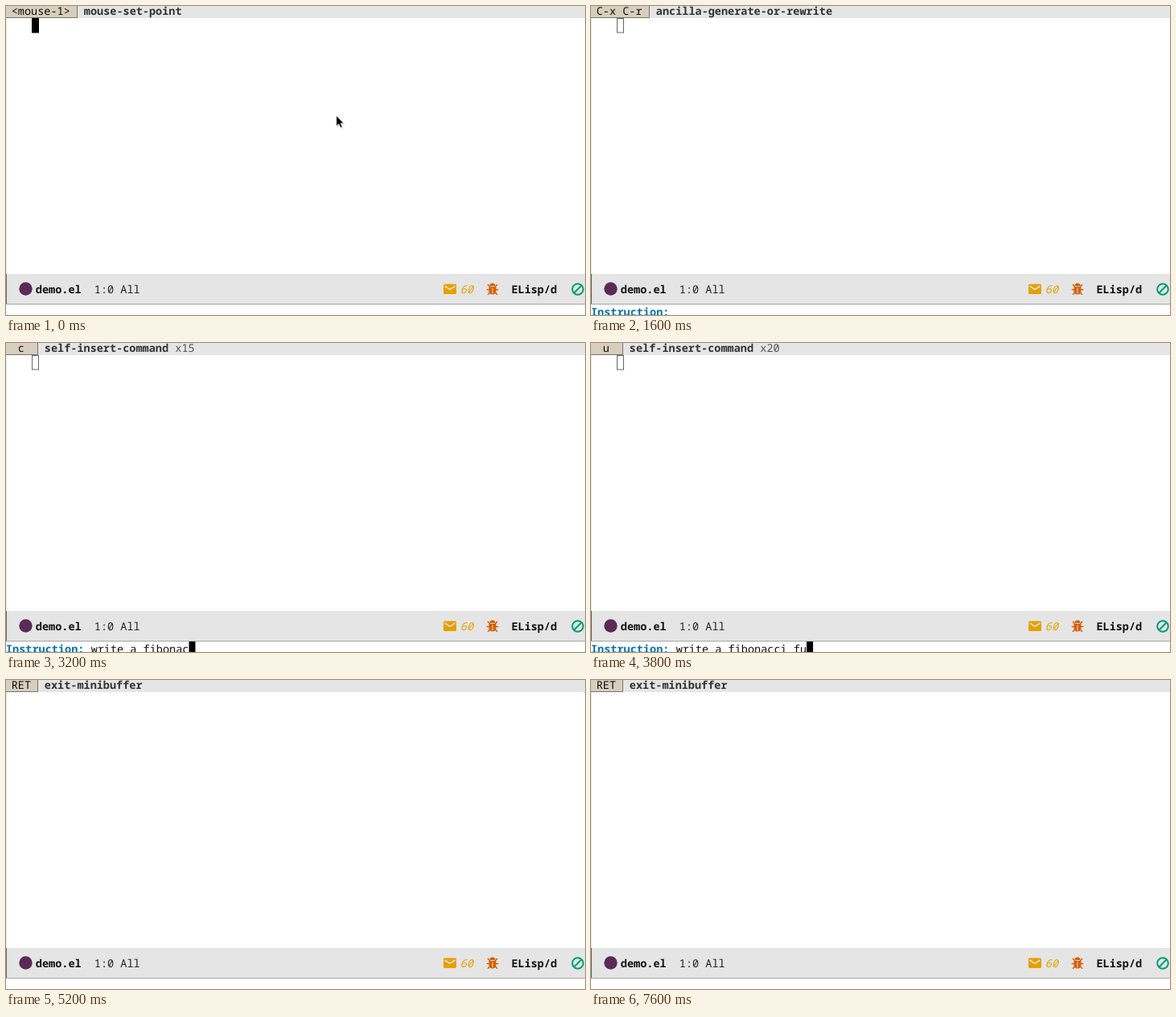
Write an HTML page that moves like this. It is 720x384 px and loops after 8 s.

```html
<!DOCTYPE html>
<html lang="en">
<head>
<meta charset="utf-8">
<title>Editor demo</title>
<style>
  html, body { margin: 0; width: 100%; height: 100%; overflow: hidden; background: #fff; }
  svg { display: block; width: 720px; height: 384px; }
  text {
    font: 13.54px "Noto Sans Mono", "DejaVu Sans Mono", monospace;
    text-rendering: geometricPrecision;
    white-space: pre;
    fill: #111;
  }
  .bold { font-weight: 700; }
</style>
</head>
<body>
<svg viewBox="0 0 720 384">
  <path d="M.5 15V333" stroke="#e8e8e8"/>

  <!-- Header: last key and its command -->
  <rect width="720" height="15" fill="#e5e5e5"/>
  <rect id="keyBox" height="14" fill="#d7cebe"/>
  <path id="keyEdge" fill="none" stroke="#77736b"/>
  <text id="key" y="11"></text>
  <text id="command" y="11" class="bold" style="fill:#333"></text>
  <text id="count" y="11" style="fill:#555"></text>

  <rect id="point" x="32.5" y="15.5" width="8" height="17.5"/>

  <!-- Mode line -->
  <rect y="333" width="720" height="38" fill="#e5e5e5"/>
  <path d="M.5 333V371" stroke="#666"/>
  <path d="M0 370.5H720" stroke="#a5a5a5"/>
  <circle cx="24.5" cy="351.5" r="8.2" fill="#5b2b57"/>
  <text x="36.8" y="357" class="bold">demo.el</text>
  <text x="109.8" y="357" style="fill:#222">1:0 All</text>
  <rect x="544" y="345.5" width="16" height="12.5" rx="1.5" fill="#e69f00"/>
  <path d="M545.5 348L552 352.3 558.5 348" fill="none" stroke="#e5e5e5" stroke-width="1.5"/>
  <text x="564.8" y="357" style="fill:#e69f00;font-style:italic">60</text>
  <g stroke="#d55e00" stroke-width="1.5" fill="none">
    <path d="M599 346l3 3.2M611 346l-3 3.2M597.7 352.5h14.6M599 358.7l3-3.2M611 358.7l-3-3.2"/>
    <path d="M601.6 348a3.4 3.4 0 0 1 6.8 0z" fill="#d55e00" stroke="none"/>
    <path d="M600.6 349h8.8v5a4.4 4.6 0 0 1-8.8 0z" fill="#d55e00" stroke="none"/>
    <path d="M605 350.5v7" stroke="#e5e5e5" stroke-width="1"/>
  </g>
  <text x="628.4" y="357" class="bold">ELisp/d</text>
  <g fill="none" stroke="#009e73" stroke-width="2">
    <circle cx="711" cy="352" r="6.8"/>
    <path d="M706.3 356.7l9.4-9.4"/>
  </g>

  <!-- Minibuffer -->
  <g id="minibuffer">
    <text y="385" class="bold" style="fill:#0072b2">Instruction:</text>
    <text id="input" y="385"></text>
    <rect id="caret" y="371" width="8" height="18"/>
  </g>

  <g id="mouse">
    <path d="M412 137.5v13l3-2.7 2 4.6 2.3-1-2-4.4h4z" fill="#0003"/>
    <path d="M410.8 136.3v13l3-2.7 2 4.6 2.3-1-2-4.4h4z" stroke="#fff" stroke-width=".7"/>
  </g>
</svg>
<script>
const LOOP = 8000, STEP = 200, CHAR = 8.125;
const PROMPT_AT = 1000, TYPE_AT = 1600, RETURN_AT = 4600, BLINK = 500;
const PHRASE = 'write a fibonacci function';
const TYPING = [[TYPE_AT, 0], [2400, 9], [3800, 20], [4400, PHRASE.length]];

const el = Object.fromEntries([...document.querySelectorAll('[id]')].map(e => [e.id, e]));
const show = (node, visible) => node.setAttribute('visibility', visible ? 'visible' : 'hidden');
const put = (node, x, text) => {
  node.setAttribute('x', x);
  node.textContent = text;
};

function typedCount(t) {
  for (let i = 1; i < TYPING.length; i++) {
    const [t0, n0] = TYPING[i - 1], [t1, n1] = TYPING[i];
    if (t <= t1) return Math.max(0, Math.floor(n0 + (n1 - n0) * (t - t0) / (t1 - t0)));
  }
  return PHRASE.length;
}

function lastCommand(t, typed) {
  if (t < PROMPT_AT) return ['<mouse-1>', 'mouse-set-point'];
  if (t >= RETURN_AT) return ['RET', 'exit-minibuffer'];
  if (!typed) return ['C-x C-r', 'ancilla-generate-or-rewrite'];
  const char = PHRASE[typed - 1];
  return [char === ' ' ? 'SPC' : char, 'self-insert-command', typed > 1 ? 'x' + typed : ''];
}

function drawHeader([key, command, count = '']) {
  const cells = Math.max(3, key.length);
  const right = Math.round(15 + cells * CHAR);
  el.keyBox.setAttribute('width', right);
  el.keyEdge.setAttribute('d', `M0 14.5H${right + .5}V0`);
  put(el.key, 6.7 + (cells - key.length) / 2 * CHAR, key);
  put(el.command, right + 8.8, command);
  put(el.count, right + 8.8 + (command.length + 1) * CHAR, count);
}

function draw(t) {
  const typed = typedCount(t);
  const prompting = t >= PROMPT_AT && t < RETURN_AT;
  drawHeader(lastCommand(t, typed));

  const sinceReturn = t - RETURN_AT - 100;
  const blinkedOff = sinceReturn >= 0 && Math.floor(sinceReturn / BLINK) % 2 === 1;
  show(el.point, !blinkedOff);
  el.point.setAttribute('fill', prompting ? 'none' : '#000');
  el.point.setAttribute('stroke', prompting ? '#666' : '#000');

  el.minibuffer.style.display = prompting ? '' : 'none';
  const inputX = 13 * CHAR;
  put(el.input, inputX, PHRASE.slice(0, typed));
  el.caret.setAttribute('x', inputX + typed * CHAR);
  show(el.caret, prompting && (t < TYPE_AT || typed > 0));
  show(el.mouse, t < PROMPT_AT);
}

const start = performance.now();
function tick() {
  const t = (performance.now() - start) % LOOP;
  draw(Math.floor(t / STEP) * STEP);
  requestAnimationFrame(tick);
}
tick();
</script>
</body>
</html>
```
